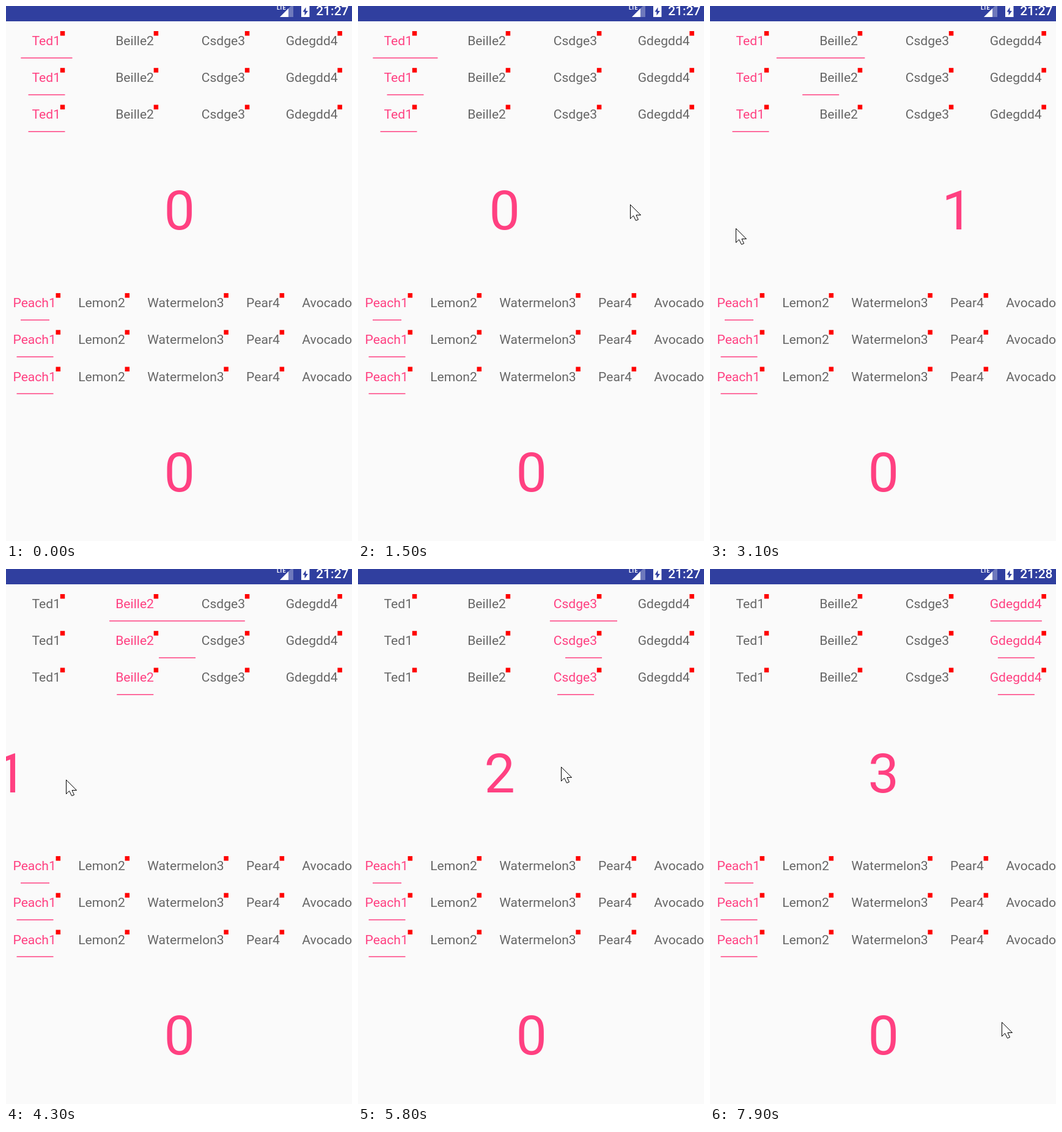
An HTML page that plays this animation: 566x874 px, repeating every 8000 ms.

```html
<!DOCTYPE html>
<html lang="en">
<head>
<meta charset="utf-8">
<title>Tab indicators</title>
<style>
  html, body { margin: 0; width: 100%; height: 100%; overflow: hidden; background: #fafafa; }
  svg { display: block; width: 566px; height: 874px; font-family: Roboto, sans-serif; }
  .tab { font-size: 21.1px; fill: #666; }
  .tab.on, .digit, .line { fill: #ff4081; }
  .digit { font-size: 89.8px; text-anchor: middle; }
  .dot { fill: #f00; }
</style>
</head>
<body>
<svg id="stage" viewBox="0 0 566 874">
  <g id="tabs"></g>
  <g id="digits"></g>
  <rect width="566" height="25" fill="#303f9f"/>
  <g fill="#fff">
    <text x="443" y="6" font-size="9" font-weight="700">LTE</text>
    <path d="M448 18L470 -4V18Z" opacity=".3"/>
    <path d="M448 18L462 4V18Z"/>
    <path d="M483 0H496.5V18H483Z"/>
    <text id="clock" x="560.5" y="15" font-size="21" font-weight="500" text-anchor="end"></text>
  </g>
  <path d="M490.500 2L485.500 9.500H488.500V15.500L494 8H490.500Z" fill="#303f9f"/>
  <path id="cursor" d="M.5 .5V23.500L5.500 18.500L9.500 26.500L13.500 25L10 17.500H17.500Z" fill="#fff" stroke="#000"/>
</svg>
<script>
const LOOP = 8000, STEP = 100, SETTLE = 300;
const ROW = 60.2, PANEL = 428.1, TAB = 144.8, PAGE = 580, CENTER = 283.7;

// Each swipe drags the pager, then lets it settle on a page; the last is a tap.
const swipes = [
  { start: 1100, release: 3200, drag: 0.797, to: 1 },
  { start: 3800, release: 4300, drag: 1.475, to: 2 },
  { start: 4900, release: 5000, drag: 2.1, to: 3 },
  { start: 5600, release: 5700, drag: 2.68, to: 2 },
  { start: 6000, release: 6100, drag: 1.62, to: 1 },
  { start: 6899, release: 6900, drag: 1, to: 3 }
];
// Turning points of the mouse pointer: [ms, x, y]
const turns = [
  [100, 474, 168], [700, 527, 305], [1500, 445, 324], [3100, 42, 363], [3700, 400, 398],
  [4300, 98, 344], [4800, 400, 320], [5200, 181, 325], [5700, 400, 322], [5950, 230, 325],
  [6100, 430, 310], [6500, 502, 63], [7100, 502, 63], [7700, 423, 677], [7900, 477, 740]
];

const $ = id => document.getElementById(id);
function add(parent, tag, attrs, text = "") {
  const node = document.createElementNS("http://www.w3.org/2000/svg", tag);
  for (const name in attrs) node.setAttribute(name, attrs[name]);
  node.textContent = text;
  return parent.appendChild(node);
}

const clamp = v => Math.max(0, Math.min(1, v));
const mix = (a, b, k) => a + (b - a) * k;
const smooth = k => k * k * (3 - 2 * k);
const settle = k => 1 - (1 - k) ** 5;

function pagerAt(t) {
  let page = 0, selected = 0;
  for (const { start, release, drag, to } of swipes) {
    if (t <= start) break;
    page = mix(page, drag, smooth(clamp((t - start) / (release - start))));
    page = mix(page, to, settle(clamp((t - release) / SETTLE)));
    if (t > release) selected = to;
  }
  return { page, selected };
}

function cursorAt(t) {
  const next = turns.find(turn => turn[0] > t) ?? turns.at(-1);
  const last = turns.findLast(turn => turn[0] <= t) ?? next;
  const k = clamp((t - last[0]) / (next[0] - last[0] || 1));
  return [1, 2].map(i => Math.round(mix(last[i], next[i], k)));
}

// placeX gives a label's left edge from its width and index.
function addRow(y, labels, placeX) {
  return labels.map((label, i) => {
    const tab = add($("tabs"), "text", { class: "tab", y: y + 64 }, label);
    const width = tab.getComputedTextLength(), x = placeX(width, i);
    tab.setAttribute("x", x);
    add($("tabs"), "rect", { class: "dot", x: x + width - 0.3, y: y + 41, width: 7.5, height: 7.5 });
    return tab;
  });
}
const addLine = (y, x, width) =>
  add($("tabs"), "rect", { class: "line", x, y: y + 84.1, width, height: 1.5 });

const topRows = [], topLines = [];
for (let r = 0; r < 3; r++) {
  const y = r * ROW;
  topRows.push(addRow(y, ["Ted1", "Beille2", "Csdge3", "Gdegdd4"],
    (width, i) => 65.8 + TAB * i - width / 2));
  topLines.push(addLine(y, 36.5, 60));

  let edge = 11.5;
  const lower = addRow(y + PANEL, ["Peach1", "Lemon2", "Watermelon3", "Pear4", "Avocado5"], width => {
    const x = edge;
    edge += width + 36.4;
    return x;
  });
  lower[0].classList.add("on");
  addLine(y + PANEL, r ? 17.5 : 24, r ? 60 : 47);
}

const digits = [0, 1, 2, 3].map(n => add($("digits"), "text", { class: "digit", y: 365 }, n));
add($("digits"), "text", { class: "digit", x: CENTER, y: 365 + PANEL }, "0");

function draw(t) {
  const { page, selected } = pagerAt(t), [x, y] = cursorAt(t);
  const base = Math.floor(page), part = page - base;

  digits.forEach((digit, n) => digit.setAttribute("x", CENTER + (n - page) * PAGE));
  topRows.forEach(row => row.forEach((tab, n) => tab.classList.toggle("on", n === selected)));

  // Stretching, sliding and jumping indicators
  const left = 24.3 + TAB * (base + Math.max(0, 2 * part - 1));
  const right = 108.5 + TAB * (base + Math.min(1, 2 * part));
  topLines[0].setAttribute("x", left);
  topLines[0].setAttribute("width", right - left);
  topLines[1].setAttribute("x", 36.5 + TAB * page);
  topLines[2].setAttribute("x", 36.5 + TAB * base);

  $("clock").textContent = t < 7300 ? "21:27" : "21:28";
  $("cursor").setAttribute("transform", `translate(${x} ${y})`);
  $("cursor").setAttribute("visibility", t < 100 ? "hidden" : "visible");
}

const start = performance.now();
function tick() {
  const t = (performance.now() - start) % LOOP;
  draw(Math.floor(t / STEP) * STEP);
  requestAnimationFrame(tick);
}
tick();
</script>
</body>
</html>
```
